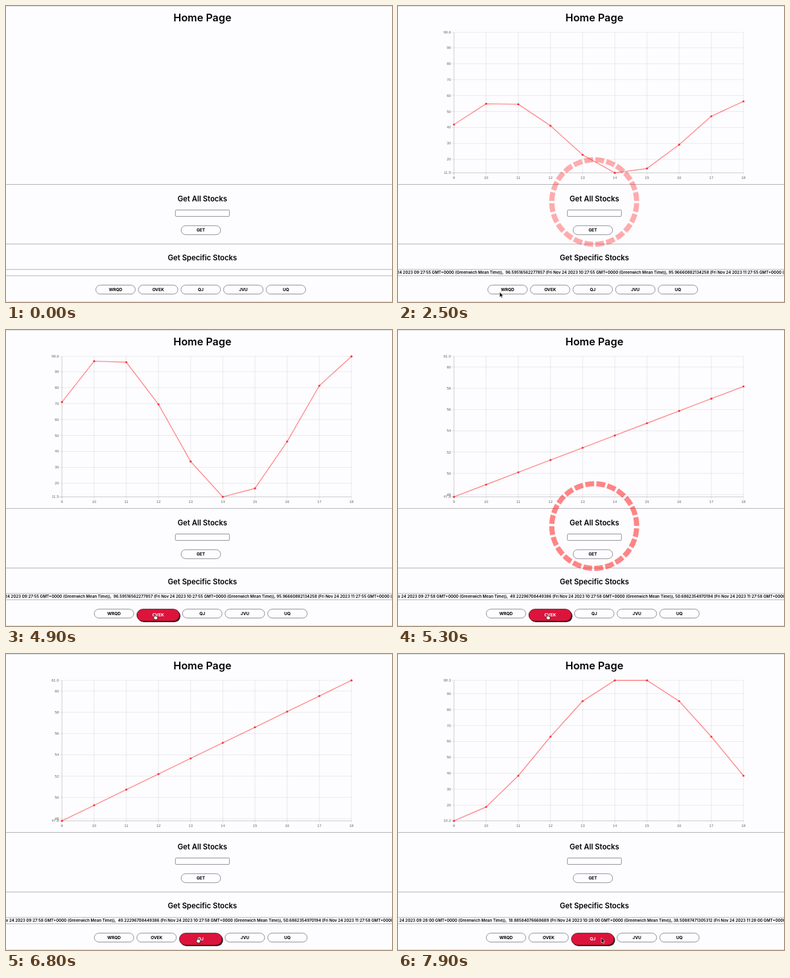
Write an HTML page that moves like this. It is 600 px wide and 462 px high and loops after 8 s.

```html
<!DOCTYPE html>
<html lang="en">
<head>
<meta charset="utf-8">
<title>Home Page</title>
<style>
  html, body { margin: 0; width: 100%; height: 100%; overflow: hidden; background: #fdfcff; }
  svg { display: block; width: 100%; height: 100%; }
  text { font-family: Inter, sans-serif; font-weight: 600; fill: #000; }
  .mid { text-anchor: middle; }
  .end { text-anchor: end; }
  .title { font-size: 16.3px; }
  .heading { font-size: 11.4px; }
  .label { font-size: 6.5px; font-weight: 700; text-anchor: middle; }
  .ticker { font-size: 6.15px; white-space: pre; }
  .tick { font: 5.9px "Liberation Sans", Arial, sans-serif; fill: #666; }
  .rule { stroke: #b4b3b6; }
  .edge { stroke: #dedde0; }
  .grid { stroke: #000; stroke-opacity: .1; stroke-width: .8; }
  .axis { stroke: #000; stroke-opacity: .25; stroke-width: .8; }
  .series { fill: none; stroke: #f00; stroke-opacity: .45; stroke-width: 1.4; stroke-linejoin: round; }
  .dot { fill: #f5333a; }
  .pill { fill: #fdfcff; stroke: #858488; stroke-width: .9; }
  .shadow { fill: #2b1a1e; visibility: hidden; }
  .hover .pill { fill: #dc143c; stroke: #5a1020; }
  .hover .label { fill: #fff; }
  .hover .shadow { visibility: visible; }
</style>
</head>
<body>
<svg id="stage" viewBox="0 0 600 462">
  <rect width="600" height="462" fill="#fdfcff"/>
  <path class="edge" d="M0 .5H600M0 461.5H600"/>
  <path class="rule" d="M0 278.5H600M0 371.5H600M0 411.2H600M0 421H600"/>
  <text class="title mid" x="305.3" y="23.8">Home Page</text>
  <g id="chart"></g>
  <text class="heading mid" x="305.3" y="304.6">Get All Stocks</text>
  <rect x="263.3" y="318.4" width="84" height="10" rx="1.3" fill="#fff" stroke="#858488" stroke-width=".9"/>
  <rect class="pill" x="272.2" y="342.9" width="61.4" height="14" rx="7"/>
  <text class="label" x="302.8" y="352.3">GET</text>
  <text class="heading mid" x="305.3" y="397.4">Get Specific Stocks</text>
  <text class="ticker end" id="tickerPast" y="418.4"></text>
  <text class="ticker" id="tickerNext" y="418.4"></text>
  <g id="buttons"></g>
  <circle id="ring" cx="305" cy="306" r="66" fill="none" stroke="#f00" stroke-width="8"
          pathLength="240" stroke-dasharray="7.9 2.1" stroke-dashoffset="-1.05"/>
  <g id="cursor">
    <path id="arrow" d="M0 0V8L1.9 6.4L3.1 9.2L4.4 8.6L3.2 5.9H5.7Z" fill="#000" stroke="#fff" stroke-width=".6"/>
    <path id="hand" d="M1.5 5V1Q2.2 0 2.9 1V3.6L6 4.3Q6.9 4.6 6.7 6L6 9H2.2L0 5.9Q.3 4.8 1.5 5Z" fill="#fff" stroke="#000" stroke-width=".7"/>
  </g>
</svg>
<script>
const LOOP = 8000, STEP = 100, GROW = 1000, RING_LIFE = 700;
const PLOT = { left: 87, right: 537, top: 41.2, bottom: 260.4 };
const el = id => document.getElementById(id);

function add(parent, tag, attrs, text) {
  const node = document.createElementNS('http://www.w3.org/2000/svg', tag);
  for (const key in attrs) node.setAttribute(key, attrs[key]);
  if (text !== undefined) node.textContent = text;
  parent.appendChild(node);
  return node;
}

const span = (from, to, by) => {
  const out = [];
  for (let v = from; v <= to; v += by) out.push(v);
  return out;
};

const charts = [
  { start: 2337, ticks: span(20, 90, 10), low: '11.5', high: '99.6', second: 55, textX: 167,
    values: [71, 96.6, 95.97, 69.5, 33.7, 11.5, 16.8, 46.2, 81.2, 99.6],
    quotes: ['96.59516562277857', '95.96660882134258'] },
  { start: 4980, ticks: span(48, 60, 2), low: '47.8', high: '61.0', second: 58, textX: 174,
    values: span(0, 9, 1).map(i => 47.8 + 13.2 * i / 9),
    quotes: ['49.22296708449386', '50.6862354970194'] },
  { start: 6893, ticks: span(20, 90, 10), low: '10.2', high: '98.3', second: 0, textX: 172,
    values: [10.2, 18.9, 38.5, 63, 85.3, 98.3, 98.3, 85.3, 63, 38.5],
    quotes: ['18.88584076668689', '38.50887471305312'] }
];

const plotX = i => PLOT.left + 50 * i;
const plotY = (chart, v) =>
  PLOT.bottom - (v - chart.low) / (chart.high - chart.low) * (PLOT.bottom - PLOT.top);

function buildChart(chart) {
  const g = chart.node = add(el('chart'), 'g', {});
  chart.values.forEach((v, i) => {
    const x = plotX(i);
    add(g, 'path', { class: i ? 'grid' : 'axis', d: `M${x} ${PLOT.top}V${PLOT.bottom + 4}` });
    add(g, 'text', { class: 'tick mid', x, y: 270.4 }, 9 + i);
  });
  [chart.low, ...chart.ticks, chart.high].forEach((label, i) => {
    const y = plotY(chart, label);
    add(g, 'path', { class: i ? 'grid' : 'axis', d: `M${PLOT.left - 4} ${y}H${PLOT.right}` });
    add(g, 'text', { class: 'tick end', x: 82.3, y: y + 2 }, label);
  });
  chart.line = add(g, 'polyline', { class: 'series' });
  chart.dots = chart.values.map((v, i) => add(g, 'circle', { class: 'dot', cx: plotX(i), r: 1.6 }));
}

function growChart(chart, t) {
  const p = Math.min(1, (t - chart.start) / GROW);
  const eased = 1 - (1 - p) ** 4;
  const ys = chart.values.map(v => PLOT.bottom + (plotY(chart, v) - PLOT.bottom) * eased);
  chart.line.setAttribute('points', ys.map((y, i) => `${plotX(i)},${y}`).join(' '));
  chart.dots.forEach((dot, i) => dot.setAttribute('cy', ys[i]));
}

function stamp(hour, second) {
  const minute = second ? 27 : 28;
  const clock = [hour, minute, second].map(n => String(n).padStart(2, '0')).join(':');
  return `(Fri Nov 24 2023 ${clock} GMT+0000 (Greenwich Mean Time))`;
}

function showTicker(chart) {
  const past = el('tickerPast'), next = el('tickerNext');
  past.textContent = chart ? stamp(9, chart.second) + ',' : '';
  next.textContent = chart
    ? chart.quotes.map((q, i) => `${q} ${stamp(10 + i, chart.second)}`).join(', ') : '';
  if (!chart) return;
  past.setAttribute('x', chart.textX - 3);
  next.setAttribute('x', chart.textX);
}

const buttons = ['WRQD', 'OVEK', 'QJ', 'JVU', 'UQ'].map(name => {
  const g = add(el('buttons'), 'g', {});
  return {
    g,
    shadow: add(g, 'rect', { class: 'shadow', y: 437.3, width: 66.4, height: 18.6, rx: 9.3 }),
    pill: add(g, 'rect', { class: 'pill', y: 435.7, rx: 7 }),
    label: add(g, 'text', { class: 'label' }, name)
  };
});

function layoutButtons(hovered) {
  let x = hovered < 0 ? 139.6 : 137.2;
  buttons.forEach(({ g, shadow, pill, label }, i) => {
    const on = i === hovered, width = on ? 66.2 : 61.4, height = on ? 18.6 : 13.9;
    g.setAttribute('class', on ? 'hover' : '');
    shadow.setAttribute('x', x + 1.4);
    pill.setAttribute('x', x);
    pill.setAttribute('width', width);
    pill.setAttribute('height', height);
    pill.setAttribute('rx', height / 2);
    label.setAttribute('x', x + width / 2);
    label.setAttribute('y', on ? 447.4 : 445);
    x += width + 4.8;
  });
}

// [from, to, button, time the pointer turns back into an arrow]
const hovers = [[1800, 2400, 0, 2400], [3000, 3900, 0, 3000], [4000, 6300, 1, 5500], [6500, 8000, 2, 7500]];

// [time, x, y]
const track = [
  [1300, 91, 426], [2100, 158, 446], [2500, 158, 446.5], [3400, 165, 447], [3700, 170, 446],
  [4200, 226, 444], [4900, 229, 443], [5400, 230, 443], [6100, 250, 443.5], [6200, 254, 443.5],
  [6700, 295, 442], [7200, 299, 441], [7500, 301, 441], [7900, 316, 443]
];

function cursorAt(t) {
  const n = track.findIndex(key => key[0] > t);
  if (n < 0) return track[track.length - 1].slice(1);
  const [t0, x0, y0] = track[n - 1], [t1, x1, y1] = track[n];
  const p = (t - t0) / (t1 - t0), e = p * p * (3 - 2 * p);
  return [x0 + (x1 - x0) * e, y0 + (y1 - y0) * e];
}

const show = (node, on) => node.setAttribute('visibility', on ? 'visible' : 'hidden');

function render(t) {
  const current = charts.filter(c => t >= c.start).pop();
  charts.forEach(c => c.node.setAttribute('display', c === current ? 'inline' : 'none'));
  if (current) growChart(current, t);
  showTicker(current);

  const age = current ? t - current.start : Infinity;
  show(el('ring'), age < RING_LIFE);
  if (age < RING_LIFE) {
    el('ring').setAttribute('stroke-opacity', .48 * Math.sin(Math.PI * age / RING_LIFE));
    el('ring').setAttribute('transform', `rotate(${(age - 163) * 15 / 144} 305 306)`);
  }

  const hover = hovers.find(h => t >= h[0] && t < h[1]);
  layoutButtons(hover ? hover[2] : -1);

  const visible = t >= track[0][0], pointing = hover && t < hover[3];
  show(el('arrow'), visible && !pointing);
  show(el('hand'), visible && pointing);
  if (visible) el('cursor').setAttribute('transform', `translate(${cursorAt(t)})`);
}

charts.forEach(buildChart);
let shown = -1;
function tick() {
  const t = Math.floor(performance.now() % LOOP / STEP) * STEP;
  if (t !== shown) render(shown = t);
  requestAnimationFrame(tick);
}
tick();
</script>
</body>
</html>
```
